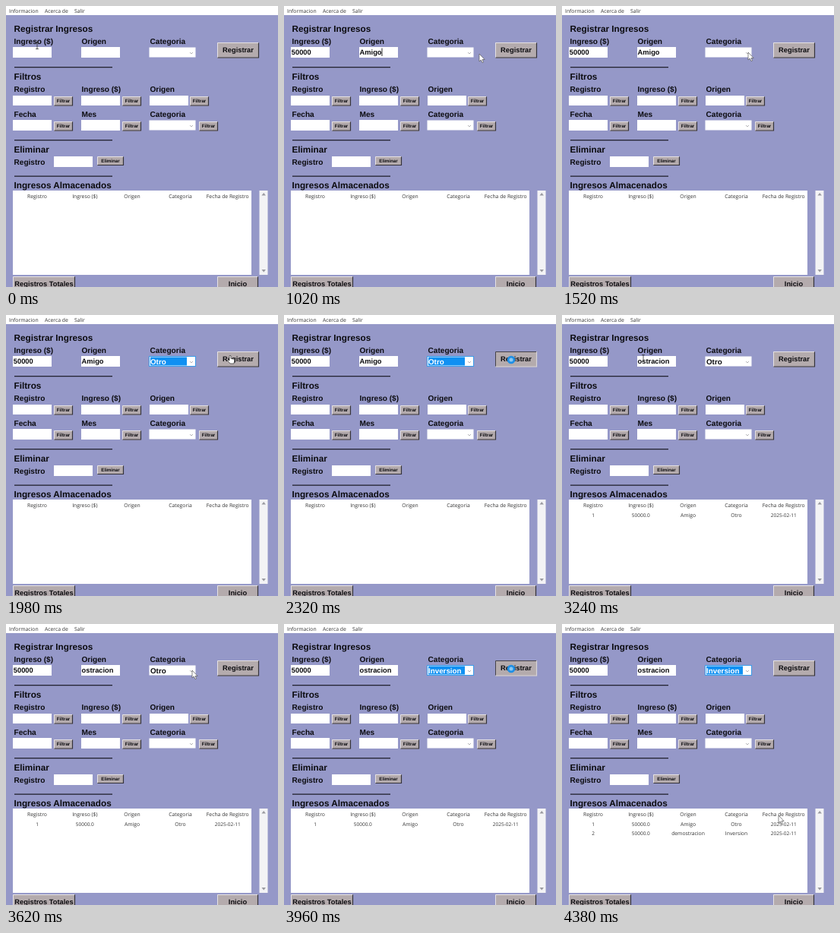
Animation of 358 by 370 pixels, one loop 4.48 s. Source, as an HTML page:

```html
<!DOCTYPE html>
<html lang="es">
<head>
<meta charset="utf-8">
<style>
html, body { margin: 0; width: 100%; height: 100%; overflow: hidden; background: #9598c8; }
svg { display: block; }
text { font: bold 9.3px "Liberation Sans", Arial, sans-serif; fill: #0c0c10; text-rendering: geometricPrecision; white-space: pre; }
text.title { font-size: 11.75px; }
text.label { font-size: 10.1px; }
text.small { font-size: 6.2px; }
text.combo { font-size: 9.8px; }
text.ui { font: 6.8px "Open Sans", "Noto Sans", sans-serif; fill: #333; }
text.num { font-size: 6.5px; }
.mid { text-anchor: middle; }
</style>
</head>
<body>
<svg id="stage" width="358" height="370" viewBox="0 0 358 370"></svg>
<script>
const stage = document.getElementById('stage');
const LOOP = 4480;

function add(tag, attrs, parent = stage) {
  const el = document.createElementNS('http://www.w3.org/2000/svg', tag);
  for (const key in attrs) el.setAttribute(key, attrs[key]);
  return parent.appendChild(el);
}
const rect = (x, y, width, height, fill, parent) => add('rect', { x, y, width, height, fill }, parent);
const path = (d, stroke, parent, fill = 'none', w = 1) =>
  add('path', { d, stroke, fill, 'stroke-width': w }, parent);
function text(x, y, str, cls = '', parent) {
  const el = add('text', { x, y, class: cls }, parent);
  el.textContent = str;
  return el;
}
const show = (el, on) => el.setAttribute('visibility', on ? 'visible' : 'hidden');

function button(x, y, w, h, label, cls = '') {
  rect(x, y, w, h, '#b4abad');
  const dark = path(`M${x + .5} ${y + h - .5}H${x + w - .5}V${y + .5}`, '#34323a', stage, 'none', 1.2);
  const light = path(`M${x + .5} ${y + h - 1}V${y + .5}H${x + w - 1}`, '#e6e2e4');
  text(x + w / 2, y + h / 2 + (cls ? 2.2 : 3.2), label, 'mid ' + cls);
  return down => {
    dark.setAttribute('stroke', down ? '#d8d4d8' : '#34323a');
    light.setAttribute('stroke', down ? '#45424a' : '#e6e2e4');
  };
}
const entry = (x, y, h = 14) => rect(x, y, 51, h, '#fff');
function combo(x, y) {
  const box = rect(x + .5, y + .5, 61, 13, '#fff');
  path(`M${x + 54} ${y + 7}l2 2 2-2`, '#a3a3a8', stage, 'none', .8);
  return box;
}

// Menu, headings and rules
rect(0, 0, 358, 370, '#9598c8');
rect(0, 0, 358, 12, '#fff');
[[4, 'Informacion'], [51, 'Acerca de'], [90, 'Salir']].forEach(([x, s]) => text(x, 8.5, s, 'ui'));
[[34, 'Registrar Ingresos'], [97, 'Filtros'], [193, 'Eliminar'], [239.5, 'Ingresos Almacenados']]
  .forEach(([y, s]) => text(10.5, y, s, 'title'));
[80, 176, 223.5].forEach(y => rect(11, y, 129, 1.3, '#222230'));
[
  [50, 'Ingreso ($)', 'Origen', 'Categoria'],
  [112.5, 'Registro', 'Ingreso ($)', 'Origen'],
  [146, 'Fecha', 'Mes', 'Categoria'],
  [208.5, 'Registro']
].forEach(([y, ...names]) => names.forEach((s, i) => text([10.5, 99.5, 189.5][i], y, s, 'label')));

// Fields and buttons
entry(9, 54);
entry(99, 54);
const category = combo(188, 54);
const press = button(278, 48, 55, 20.5, 'Registrar');
[9, 99, 189].forEach(x => entry(x, 118, 13));
[63, 153, 242].forEach(x => button(x, 119, 25, 12.5, 'Filtrar', 'small'));
[9, 99].forEach(x => entry(x, 150));
combo(188, 150);
[63, 153, 254].forEach(x => button(x, 152, 25, 12.5, 'Filtrar', 'small'));
entry(63, 198);
button(120, 198, 35, 12, 'Eliminar', 'small');
button(9, 356, 82, 20, 'Registros Totales');
button(278, 356, 54, 20, 'Inicio');

// Table
rect(9, 243, 314, 111, '#fff');
rect(333.5, 243, 11, 111, '#f3f3f5');
path('M336.5 249.5l2.7-3.5 2.7 3.5z', 'none', stage, '#9a9aa0');
path('M336.5 347l2.7 3.5 2.7-3.5z', 'none', stage, '#9a9aa0');
const columns = [41, 103.8, 166, 229.5, 291.8];
['Registro', 'Ingreso ($)', 'Origen', 'Categoria', 'Fecha de Registro']
  .forEach((s, i) => text(columns[i], 253.3, s, 'ui mid'));
const rows = [['Amigo', 'Otro'], ['demostracion', 'Inversion']].map(([source, kind], n) => {
  const g = add('g', {});
  [n + 1, '50000.0', source, kind, '2025-02-11'].forEach((s, i) =>
    text(columns[i], 266 + 11.6 * n, s, 'ui mid' + (i == 2 || i == 3 ? '' : ' num'), g));
  return g;
});

// Changing field contents
const amount = text(9.8, 64, '');
const origin = text(99.6, 64, '');
const marked = rect(190, 55.5, 48, 11, '#1090f2');
const choice = text(190, 64.6, '', 'combo');
const caret = rect(0, 55.5, .9, 10.5, '#111');

// Pointers, each with its hot spot at 0,0
const pointers = {
  beam: add('g', {}), arrow: add('g', {}), hand: add('g', {}), busy: add('g', {})
};
path('M-1.8-4.5H1.8M0-4.5V4.5M-1.8 4.5H1.8', '#333', pointers.beam, 'none', .8);
path('M0 0V10L2.3 8 4 11.6 5.6 10.9 4 7.5H7.1Z', '#555', pointers.arrow, '#fff', .7);
path('M-1 6V.8Q0-.5 1 .8V4.3L5 5.2Q6 5.5 5.8 7L5 11H0L-3.5 6.8Q-3.4 5-1 7Z', '#333', pointers.hand, '#fff', .7);
add('circle', { r: 3.9, fill: '#8cc8f2', stroke: '#1f8fe5', 'stroke-width': 2.8 }, pointers.busy);

// Time, x, y and pointer shape from that time on
const track = [
  [0, 41, 52, 'beam'], [440, 41, 52, 'beam'], [560, 112, 60, 'beam'],
  [900, 112, 60, 'arrow'], [1020, 257, 63, 'arrow'], [1060, 257, 63, 'arrow'],
  [1180, 245, 61, 'arrow'], [1640, 245, 61, 'arrow'], [1820, 270, 60, 'arrow'],
  [1840, 278, 58, 'hand'], [1940, 295, 53, 'hand'], [2080, 299, 59, 'busy'],
  [2340, 295, 53, 'hand'], [2420, 278, 55, 'arrow'], [2640, 135, 56, 'arrow'],
  [2700, 135, 56, 'beam'], [2820, 107, 57, 'beam'], [3340, 107, 57, 'beam'],
  [3400, 150, 58, 'arrow'], [3520, 245, 61, 'arrow'], [3720, 245, 61, 'arrow'],
  [3800, 278, 57, 'hand'], [3880, 295, 53, 'hand'], [3940, 299, 59, 'busy'],
  [4080, 295, 53, 'hand'], [4140, 293, 72, 'arrow'], [4340, 285, 252, 'arrow'],
  [LOOP, 285, 252, 'arrow']
];
const within = (t, a, b) => t >= a && t < b;
const typed = (str, t, from, step) => str.slice(0, Math.max(0, Math.floor((t - from) / step) + 1));

function draw(t) {
  amount.textContent = typed('50000', t, 140, 60);

  let word = t < 2900 ? typed('Amigo', t, 720, 40) : typed('demostracion', t, 2920, 24);
  if (word.length > 9) word = word.slice(3);
  origin.textContent = word;

  choice.textContent = t < 1560 ? '' : t < 3660 ? 'Otro' : 'Inversion';
  const focus = within(t, 1560, 2800) || t >= 3660;
  show(marked, focus);
  choice.style.fill = focus ? '#fff' : '#0c0c10';
  category.setAttribute('stroke', focus ? '#3a9cea' : 'none');

  const inAmount = within(t, 80, 600), inOrigin = within(t, 600, 1240);
  show(caret, inAmount || inOrigin);
  const field = inAmount ? amount : origin;
  caret.setAttribute('x', (inAmount ? 9.8 : 99.6) + field.getComputedTextLength());

  press(within(t, 2020, 2340) || within(t, 3900, 4080));
  show(rows[0], t >= 2340);
  show(rows[1], t >= 4080);

  const i = track.findIndex(k => k[0] > t) - 1;
  const [t0, x0, y0, kind] = track[i], [t1, x1, y1] = track[i + 1];
  let p = (t - t0) / (t1 - t0);
  p = kind == 'busy' || t0 == 1940 ? 0 : p * p * (3 - 2 * p);
  for (const name in pointers) show(pointers[name], name == kind);
  pointers[kind].setAttribute('transform', `translate(${x0 + (x1 - x0) * p} ${y0 + (y1 - y0) * p})`);
}

const start = performance.now();
function tick() {
  draw((performance.now() - start) % LOOP);
  requestAnimationFrame(tick);
}
tick();
</script>
</body>
</html>
```
